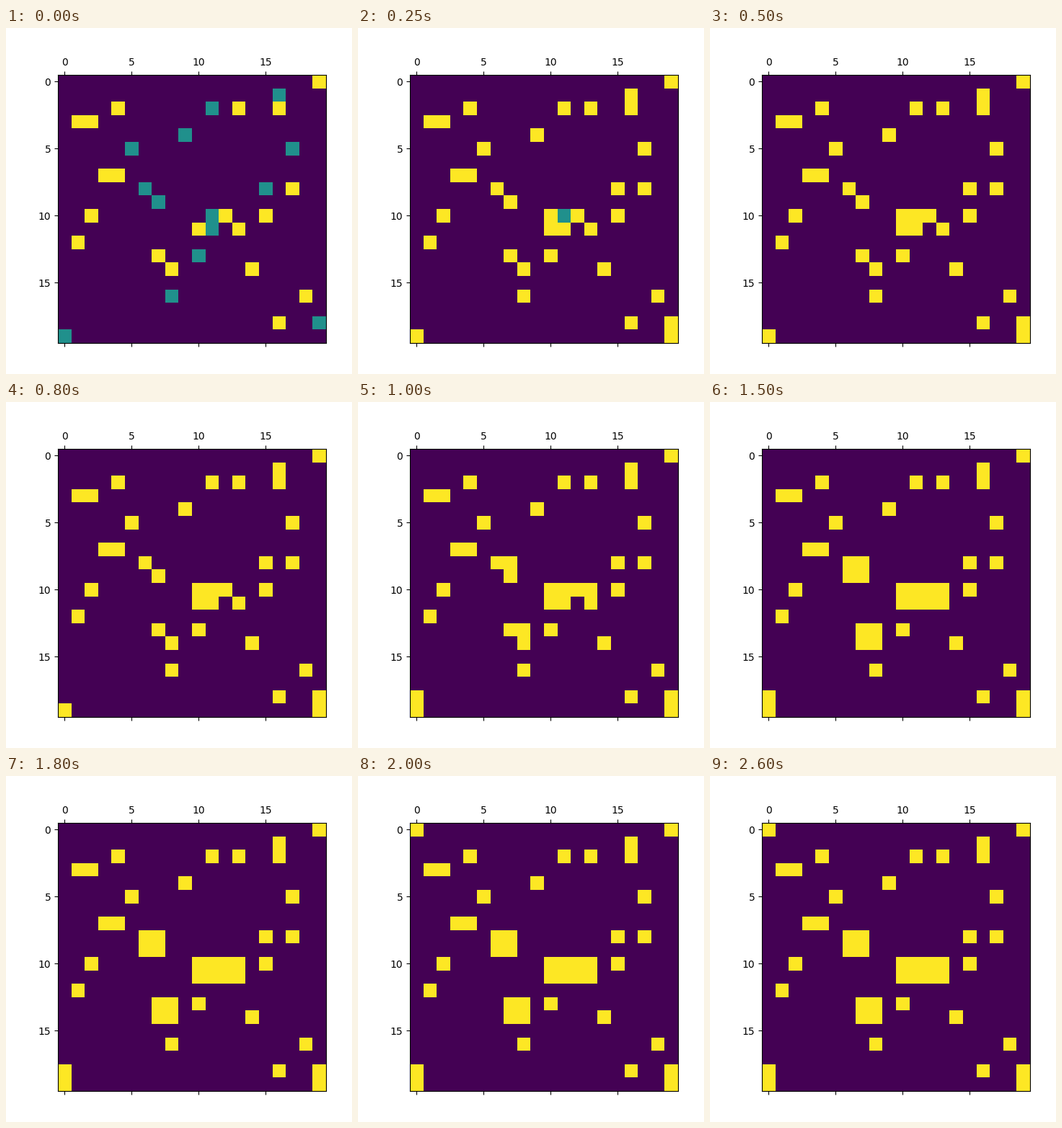
Recreate the animation shown at these times as a matplotlib script. Size 480x480 px, loop 3 s.

```python
import matplotlib.pyplot as plt
import numpy as np
from matplotlib.animation import FuncAnimation

SIZE = 20
EMPTY, FRESH, SETTLED = range(3)
TICK_MS, TICKS = 250, 12

# Starting cells, row: columns.
SETTLED_START = {0: [19], 2: [4, 13, 16], 3: [1, 2], 7: [3, 4], 8: [17],
                 10: [2, 12, 15], 11: [10, 13], 12: [1], 13: [7],
                 14: [8, 14], 16: [18], 18: [16]}
FRESH_START = {1: [16], 2: [11], 4: [9], 5: [5, 17], 8: [6, 15], 9: [7],
               10: [11], 11: [11], 13: [10], 16: [8], 18: [19], 19: [0]}

# Tick of each sweep and the corner (row step, column step) it closes.
SWEEPS = {1: (1, 1), 4: (1, -1), 6: (-1, 1), 8: (-1, -1)}


def start_grid():
    grid = np.full((SIZE, SIZE), EMPTY)
    for start, value in ((SETTLED_START, SETTLED), (FRESH_START, FRESH)):
        for row, cols in start.items():
            grid[row, cols] = value
    return grid


def cornered(grid, corner):
    """Cells whose two neighbours on the corner's sides are alive (edges wrap)."""
    alive = grid != EMPTY
    down, right = corner
    return np.roll(alive, -down, axis=0) & np.roll(alive, -right, axis=1)


def step(grid, tick):
    """Close corners and settle fresh cells; a fresh cell in a corner waits."""
    closing = cornered(grid, SWEEPS[tick]) if tick in SWEEPS else False
    return np.where((grid == FRESH) ^ closing, SETTLED, grid)


def grid_at(tick):
    grid = start_grid()
    for t in range(1, tick + 1):
        grid = step(grid, t)
    return grid


fig = plt.figure(figsize=(4.8, 4.8), dpi=100)
ax = fig.add_axes([0.15, 0.09, 0.775, 0.775])
image = ax.matshow(start_grid(), cmap="viridis", vmin=EMPTY, vmax=SETTLED)


def update(tick):
    image.set_data(grid_at(tick))
    return [image]


anim = FuncAnimation(fig, update, frames=TICKS, interval=TICK_MS,
                     repeat=True, repeat_delay=0)
plt.show()
```
